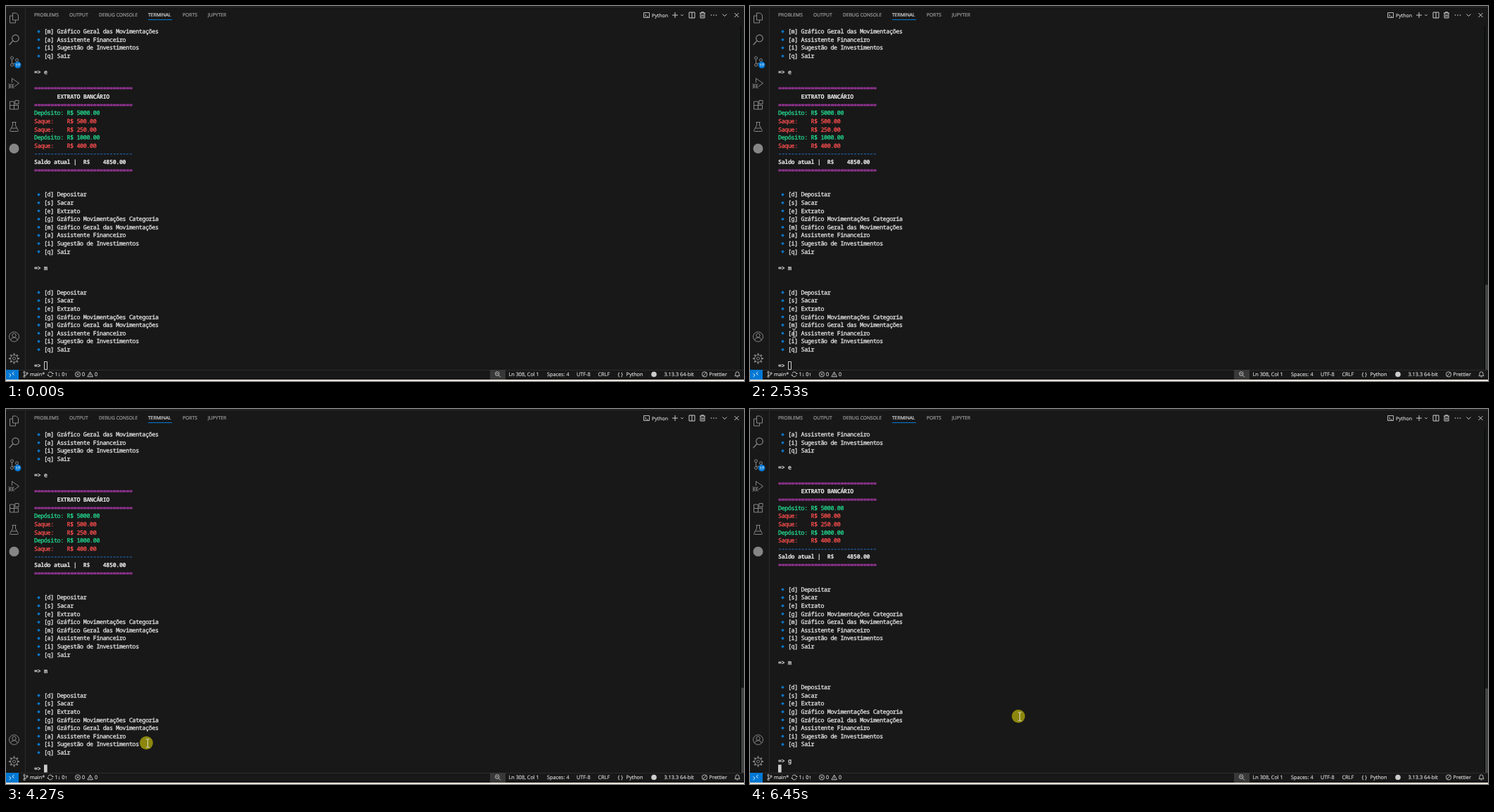
An HTML page with a canvas that plays this animation: 1049 by 534 pixels, repeating every 8000 ms.

```html
<!DOCTYPE html>
<html lang="pt">
<head>
<meta charset="utf-8">
<title>Terminal</title>
<style>
html, body { margin: 0; width: 100%; height: 100%; overflow: hidden; background: #181818; }
canvas { display: block; }
</style>
</head>
<body>
<canvas id="stage" width="1049" height="534"></canvas>
<script>
const ctx = document.getElementById('stage').getContext('2d');
ctx.textRendering = 'geometricPrecision';
ctx.lineJoin = 'round';
const LOOP = 8000;
const MONO = '"Noto Sans Mono", "DejaVu Sans Mono", monospace';
const SANS = '"Open Sans", "Noto Sans", sans-serif';
const COL = 14 / 3, ROW = 11.61, LEFT = 40, TOP = 36.3, MONO_SIZE = 8.4;
const CLICK = 3920, TYPED = 5270, ENTER = 6450;
const C = {
  bg: '#181818', line: '#2b2b2b', text: '#dcdcdc', dim: '#9d9d9d', icon: '#868686',
  blue: '#0078d4', purple: '#bc3fbc', green: '#23d18b', red: '#f14c4c', dash: '#2472c8'
};

const menu = [
  '[d] Depositar', '[s] Sacar', '[e] Extrato', '[g] Gráfico Movimentações Categoria',
  '[m] Gráfico Geral das Movimentações', '[a] Assistente Financeiro',
  '[i] Sugestão de Investimentos', '[q] Sair'
].map(s => ({ s: '   ' + s, bullet: true }));
const row = (s = '', color = C.text, bold = false) => ({ s, color, bold });
const rule = row('='.repeat(30), C.purple);
const deposit = v => row('Depósito: R$ ' + v, C.green);
const withdraw = v => row('Saque:    R$ ' + v, C.red);
const log = [
  ...menu.slice(4), row(), row('=> e'), row(),
  rule, row('       EXTRATO BANCÁRIO', '#e5e5e5', true), rule,
  deposit('5000.00'), withdraw('500.00'), withdraw('250.00'), deposit('1000.00'), withdraw('400.00'),
  row('-'.repeat(30), C.dash), row('Saldo atual |  R$    4850.00', '#e5e5e5', true), rule,
  row(), row(), ...menu, row(), row('=> m'), row(), row(), ...menu, row()
];

// Pointer path: time, x, y
const path = [
  [370, 150, 532], [520, 128, 505], [800, 92, 462], [1170, 74, 443],
  [1300, 71, 438], [1520, 66, 443], [1650, 66, 443], [1800, 61, 440], [1990, 66, 443.5],
  [2120, 78, 447], [2220, 84, 451], [2530, 62, 466], [2600, 62, 466], [2730, 52, 499.5],
  [2950, 52, 500], [3180, 59, 514], [3580, 59, 514], [3650, 59, 516], [3900, 59, 516],
  [CLICK, 58, 513], [4000, 58, 513], [4270, 201, 476], [4330, 201, 476],
  [4460, 270, 460], [4600, 348, 444], [4730, 383, 438]
];

function pointer(t) {
  const i = path.findIndex(p => p[0] > t);
  if (i === 0) return null;
  if (i < 0) return path[path.length - 1].slice(1);
  const [t0, x0, y0] = path[i - 1], [t1, x1, y1] = path[i];
  const k = (t - t0) / (t1 - t0);
  return [x0 + (x1 - x0) * k, y0 + (y1 - y0) * k];
}

function rect(x, y, w, h, color) {
  ctx.fillStyle = color;
  ctx.fillRect(x, y, w, h);
}
function disc(x, y, r, color) {
  ctx.fillStyle = color;
  ctx.beginPath();
  ctx.arc(x, y, r, 0, Math.PI * 2);
  ctx.fill();
}
// Small text gets a hairline outline to keep its strokes solid
function text(s, x, y, font, color, spacing = 0, weight = .2) {
  ctx.font = font;
  ctx.letterSpacing = spacing + 'px';
  ctx.fillStyle = ctx.strokeStyle = color;
  ctx.lineWidth = weight;
  ctx.fillText(s, x, y);
  ctx.strokeText(s, x, y);
}
const label = (s, x, y, size, color = '#d0d0d0') => text(s, x, y, `${size}px ${SANS}`, color);
function mono(s, x, y, color, bold) {
  const font = `${bold ? 'bold ' : ''}${MONO_SIZE}px ${MONO}`;
  text(s, x, y, font, color, COL - MONO_SIZE * .6, bold ? .1 : .35);
}
// Strokes an SVG path around a centre point
function icon(x, y, d, color = C.icon, width = 1) {
  ctx.save();
  ctx.translate(x, y);
  ctx.strokeStyle = color;
  ctx.lineWidth = width;
  ctx.stroke(new Path2D(d));
  ctx.restore();
}
const ring = (x, y, r) => `M${x - r} ${y}a${r} ${r} 0 1 1 ${2 * r} 0a${r} ${r} 0 1 1 ${-2 * r} 0`;

function activityBar() {
  icon(11.5, 17, 'M-2-7H3L6-4V3H-2ZM-2-3H-6V7H2V3');
  icon(11.5, 48, ring(2, -2, 4.8) + 'M-1.5 1.5L-7 7.5', C.icon, 1.2);
  icon(11.5, 79, ring(-3, -5, 2) + ring(-3, 5, 2) + ring(4, -2, 2) + 'M-3-3V3M4 0Q4 3-2 3');
  disc(16.7, 84, 4.8, C.blue);
  label('17', 13.7, 86, 5.3, '#ffffff');
  icon(11.5, 110, 'M-3-1V-7L7 0L0 5' + ring(-4, 4, 2.6) + 'M-8 1L-6 2M-8 4H-6.6M-8 7L-6 6M0 1L-2 2M0 7L-2 6M-6.6 4H-1.4');
  icon(11.5, 141, 'M-6-5H0V6H-6ZM-6 .5H6V6H0M6 .5V6M1.5-6.5H6.5V-1.5H1.5Z');
  icon(11.5, 172, 'M-3-6.5H3M-2-6.5V-2L-6 5.5Q-6 6.5-5 6.5H5Q6 6.5 6 5.5L2-2V-6.5M-4 2H4');
  disc(11.5, 203, 7, C.icon);
  icon(11.5, 471, ring(0, 0, 7) + ring(0, -2, 2.7) + 'M-5 5Q-4 1 0 1Q4 1 5 5');
  icon(11.5, 502, ring(0, 0, 2) + ring(0, 0, 5));
  for (let i = 0; i < 8; i++) {
    const a = i * Math.PI / 4, c = Math.cos(a), s = Math.sin(a);
    icon(11.5, 502, `M${c * 5} ${s * 5}L${c * 7.5} ${s * 7.5}`, C.icon, 2);
  }
}

function panelHeader() {
  const tabs = { PROBLEMS: 40, OUTPUT: 90, 'DEBUG CONSOLE': 132, TERMINAL: 202, PORTS: 251, JUPYTER: 287 };
  for (const [s, x] of Object.entries(tabs))
    label(s, x, 15.4, 6.75, s === 'TERMINAL' ? '#e0e0e0' : C.dim);
  rect(202, 19, 34, 1, C.blue);
  const ink = '#cccccc';
  icon(910.5, 13, 'M-4-3.5H4V3.5H-4ZM-2.5-1.5L-.5 .3L-2.5 2M0 2H2.5', ink, .9);
  label('Python', 918, 15.5, 7);
  icon(951, 13, 'M-4 0H4M0-4V4', ink);
  icon(961, 13, 'M-2-1L0 1L2-1', ink, .8);
  icon(975, 13, 'M-4-4H4V4H-4ZM0-4V4', ink);
  icon(990, 13, 'M-4-3H4M-1.5-3V-4.3H1.5V-3M-3-3V4H3V-3M-1-1V2.5M1-1V2.5', ink);
  for (const x of [1002.5, 1006, 1009.5]) disc(x, 13, .8, ink);
  icon(1021.5, 13, 'M-3-1.5L0 1.5L3-1.5', ink);
  icon(1038.5, 13, 'M-3-3L3 3M3-3L-3 3', ink);
}

function statusBar() {
  rect(0, 518, 1049, 14, C.bg);
  rect(0, 518, 1049, 1, C.line);
  rect(0, 518, 18, 14, C.blue);
  rect(688, 518, 22, 14, '#383838');
  rect(0, 532, 1049, 2, '#e8e3d8');
  const ink = '#cccccc', y = 524.5;
  icon(8, y, 'M-3.5-1L-1 1.2L-3.5 3.5M3.5-3.5L1-1.2L3.5 1', '#ffffff', .9);
  icon(28, y, ring(-2, -3, 1.2) + ring(-2, 3, 1.2) + ring(2, -1.5, 1.2) + 'M-2-1.8V1.8M2-.3Q2 1.5-2 1.5', ink, .9);
  icon(63, y, 'M-3.3-1Q-2-3.5 0-3.5Q2.5-3.5 3.3-1M3.3 1Q2 3.5 0 3.5Q-2.5 3.5-3.3 1M2-1H4.7M-4.7 1H-2', ink, .9);
  icon(102, y, ring(0, 0, 3.6) + 'M-1.4-1.4L1.4 1.4M1.4-1.4L-1.4 1.4', ink, .9);
  icon(119.7, y, 'M0-3.5L3.8 3.3H-3.8ZM0-1V1.2M0 2V2.7', ink, .9);
  icon(699, y, ring(-.8, -.8, 2.8) + 'M1.2 1.2L4 4M-2.2-.8H.6', ink, .9);
  disc(921, y, 3.8, ink);
  icon(993, y, ring(0, 0, 3.6) + 'M2.5-2.5L-2.5 2.5', ink, .9);
  icon(1039.5, y, 'M-3.5 2.2H3.5L2.5 .5V-1Q2.5-3.6 0-3.6Q-2.5-3.6-2.5-1V.5ZM-1 3.5H1', ink, .9);
  const items = [
    ['main*', 34], ['1↓ 0↑', 69.5], ['0', 108], ['0', 126], ['Ln 308, Col 1', 714.5],
    ['Spaces: 4', 769], ['UTF-8', 811], ['CRLF', 841.5], ['{ }', 869.5], ['Python', 881.5],
    ['3.13.3 64-bit', 935.5], ['Prettier', 999.5]
  ];
  for (const [s, x] of items) label(s, x, 527.4, 7.3);
}

function terminal(t) {
  const entered = t >= ENTER, typed = t >= TYPED;
  const rows = [...log, row(typed ? '=> g' : '=> ')];
  if (entered) rows.shift();
  rows.forEach(({ s, color = C.text, bold, bullet }, i) => {
    const y = TOP + i * ROW;
    mono(s, LEFT, y + 2.9, color, bold);
    if (bullet) {
      ctx.fillStyle = '#0a78cc';
      ctx.fill(new Path2D(`M46.5 ${y - 2.2}l2.3 2.3l-2.3 2.3l-2.3-2.3Z`));
    }
  });
  const col = entered ? 0 : typed ? 4 : 3;
  const x = LEFT + col * COL;
  if (t >= CLICK) rect(x, 506.5, COL, 11, '#cccccc');
  else icon(0, 0, 'M54.5 506.5H58.5V517.5H54.5Z', '#cccccc');
}

function scrollbar(t) {
  rect(1044, 28, 1, 490, '#010409');
  const alpha = Math.min(1, Math.max(0, (t - 430) / 120));
  const top = t >= ENTER ? 398 : 397;
  rect(1045, top, 4, 518 - top, `rgba(121,121,121,${.45 * alpha})`);
}

function mouse(t) {
  const p = pointer(t);
  if (!p) return;
  const [x, y] = p;
  if (t >= CLICK) disc(x - 1.5, y - .5, 9.4, 'rgba(255,245,0,.5)');
  if (y > 518) {
    ctx.fillStyle = '#ffffff';
    ctx.fill(new Path2D(`M${x} ${y}v10l2.5-2.3h4Z`));
    return;
  }
  icon(Math.floor(x) + .5, y, 'M0-5.5V5.5M-2.5-6H-.7L0-5.3L.7-6H2.5M-2.5 6H-.7L0 5.3L.7 6H2.5', '#e6e6e6', .9);
}

function draw(t) {
  rect(0, 0, 1049, 534, C.bg);
  rect(0, 1, 1049, 1, C.line);
  rect(27, 1, 1, 517, C.line);
  activityBar();
  panelHeader();
  terminal(t);
  scrollbar(t);
  statusBar();
  mouse(t);
}

const start = performance.now();
function tick() {
  draw((performance.now() - start) % LOOP);
  requestAnimationFrame(tick);
}
tick();
</script>
</body>
</html>
```
